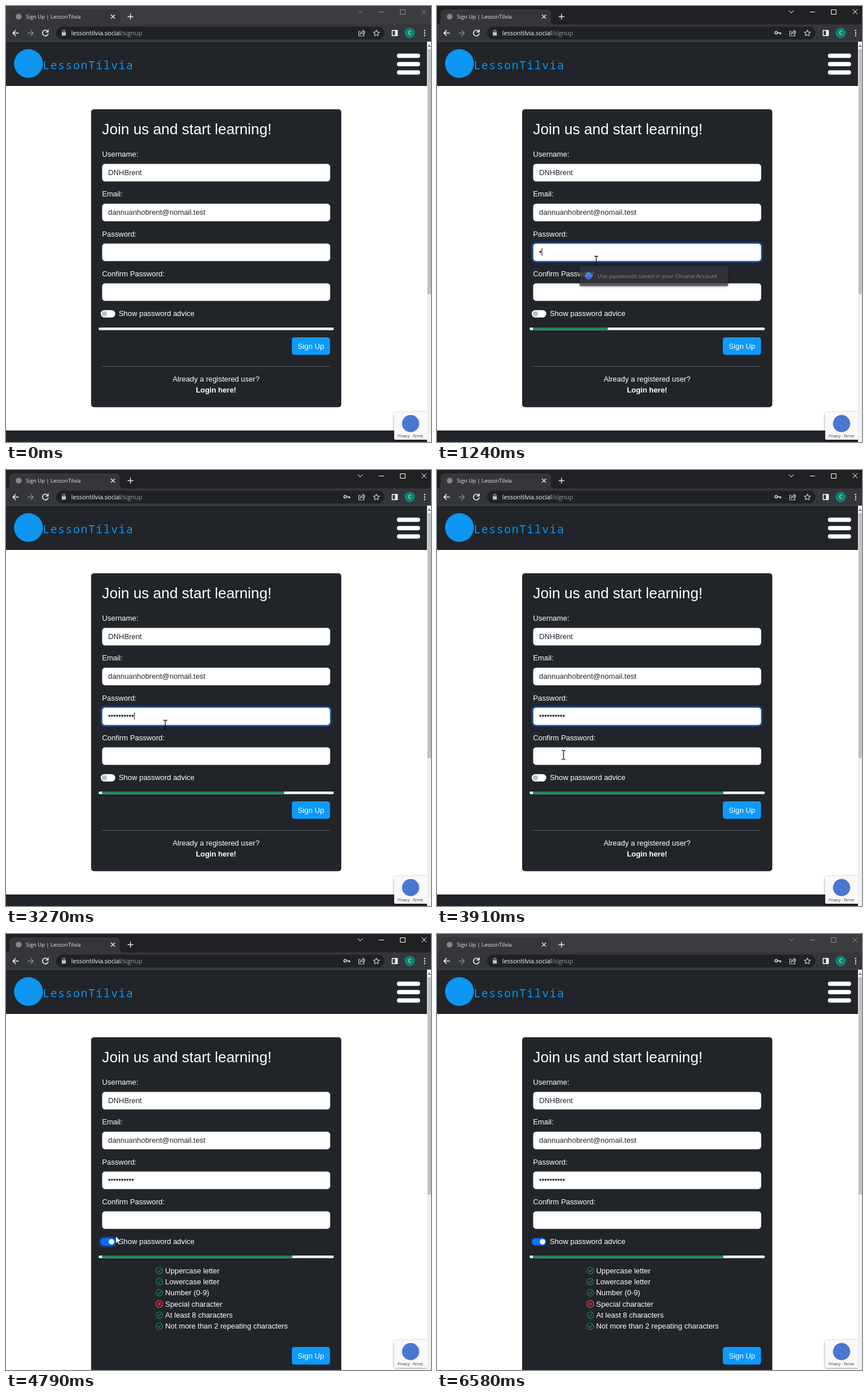
An HTML page for the animation above (6640 ms loop, 739 by 758 pixels).

```html
<!DOCTYPE html>
<html lang="en">
<head>
<meta charset="utf-8">
<title>Sign Up</title>
<style>
  html, body { margin: 0; width: 100%; height: 100%; overflow: hidden; background: #fff; }
  svg { display: block; width: 739px; height: 758px; }
  text { white-space: pre; }
  .page { font: 12.88px "Liberation Sans", Arial, sans-serif; fill: #fff; }
  .ui { font-family: "Open Sans", "Noto Sans", sans-serif; }
  .line { fill: none; stroke-linecap: round; stroke-linejoin: round; }
</style>
</head>
<body>
<svg viewBox="0 0 739 758" xmlns="http://www.w3.org/2000/svg">
  <defs>
    <filter id="soft" x="-20%" y="-20%" width="140%" height="150%">
      <feDropShadow dx="0" dy="1" stdDeviation="2" flood-color="#000" flood-opacity=".4"/>
    </filter>
  </defs>
  <rect width="739" height="758" fill="#fff"/>

  <!-- form card -->
  <g class="page">
    <rect id="card" x="148" y="179.5" width="435" height="518" rx="5" fill="#212529"/>
    <text x="167" y="223" font-size="25.76">Join us and start learning!</text>
    <g id="fields"></g>
    <g id="secret" fill="#212529">
      <text id="dots" x="177.5" y="432.3"></text>
      <path id="caret" d="M0 421v13" stroke="#111" stroke-width="1"/>
    </g>
    <rect id="toggleRing" x="161.8" y="526" width="31" height="18.2" rx="9.1" fill="#0d6efd"/>
    <rect id="toggle" x="164.6" y="528.7" width="25.4" height="12.8" rx="6.4"/>
    <circle id="knob" cy="535.1" r="4.7"/>
    <text x="196" y="539">Show password advice</text>
    <rect x="161" y="559" width="409" height="4.4" rx="2" fill="#f8f9fa"/>
    <rect id="bar" x="167" y="559" height="4.4" fill="#198754"/>
    <g id="advice"></g>
    <g id="lower">
      <rect x="497" y="576" width="66.4" height="30.6" rx="4.5" fill="#0d99ff"/>
      <text x="507.3" y="595.5">Sign Up</text>
      <path d="M167 626.5H563.5" stroke="#585c60" stroke-width="1"/>
      <text x="365.3" y="653" text-anchor="middle">Already a registered user?</text>
      <text x="365.3" y="672.3" text-anchor="middle" font-weight="bold">Login here!</text>
      <rect y="738" width="732" height="30" fill="#212529"/>
    </g>
  </g>

  <!-- privacy badge -->
  <g filter="url(#soft)"><rect x="675" y="706" width="60" height="48" rx="2" fill="#f9f9f9"/></g>
  <circle cx="703.5" cy="726" r="15" fill="#4a78d0"/>
  <text x="681" y="750" font-size="6.3" class="ui" fill="#333">Privacy - Terms</text>

  <!-- saved passwords popup -->
  <g id="popup">
    <rect x="248" y="452" width="258" height="35" rx="2" fill="#35363a" filter="url(#soft)"/>
    <circle cx="263.5" cy="469" r="6.5" fill="#4285f4"/>
    <text x="279" y="473" font-size="9.85" class="ui" fill="#a4a7ab">Use passwords saved in your Orvane Account</text>
  </g>

  <!-- site header -->
  <rect y="62" width="732" height="77" fill="#212529"/>
  <circle cx="39" cy="100" r="25" fill="#0d96f2"/>
  <text x="64" y="109.5" font-size="19.4" font-weight="500" letter-spacing="1.55" fill="#0d96f2"
        font-family="'Noto Sans Mono', 'DejaVu Sans Mono', monospace">LessonTilvia</text>
  <path class="line" d="M683.4 86.5h33M683.4 101h33M683.4 115.5h33" stroke="#fff" stroke-width="7.4"/>

  <!-- scrollbar -->
  <rect x="732" y="62" width="7" height="696" fill="#f1f1f1"/>
  <path d="M733 71l3-4 3 4z" fill="#777"/>
  <rect id="thumb" x="733" y="75" width="6" fill="#c1c1c1"/>

  <!-- browser frame -->
  <g class="ui">
    <rect id="frame" width="739" height="33"/>
    <path d="M0 32Q6 32 6 26V13Q6 6 13 6H191Q198 6 198 13V26Q198 32 204 32H739V62H0z" fill="#35363a"/>
    <path d="M0 61.5H739" stroke="#4b4c50"/>
    <circle cx="22" cy="18.5" r="5" fill="#85878a"/>
    <text x="34.5" y="22" font-size="9.3" fill="#e8eaed">Sign Up | LessonTilvia</text>
    <path class="line" d="M183 15.5l6 6m0-6l-6 6M212 18.5h9m-4.5-4.5v9" stroke="#e8eaed" stroke-width="1.4"/>
    <g id="controls" class="line" stroke-width="1">
      <path d="M612 8l4 4 4-4M649 10.5h8M686 6.5h8v8h-8zM723 6l8 8m0-8l-8 8"/>
    </g>
    <rect x="87" y="36" width="571" height="22" rx="11" fill="#202124"/>
    <g class="line" stroke="#f1f3f4" stroke-width="1.6">
      <path d="M21.5 47H12m4.5-4.5L12 47l4.5 4.5"/>
      <path d="M38 47h9.5m-4.5-4.5L47.500 47l-4.5 4.500" stroke="#85878b"/>
      <path d="M72.500 44a5 5 0 1 0 .8 4.200M73.300 41.500v3.700h-3.700"/>
    </g>
    <path d="M97 45.500h7v6h-7z" fill="#bdc1c6"/>
    <path class="line" d="M98.500 45.500v-1.500a2 2 0 0 1 4 0v1.500" stroke="#bdc1c6" stroke-width="1.100"/>
    <text x="113.500" y="50.800" font-size="10.700" fill="#fff">lessontilvia.social<tspan fill="#9aa0a6">/signup</tspan></text>
    <g class="line" stroke="#c8cbcf" stroke-width="1.200">
      <g id="key" stroke-width="1.700"><circle cx="589.700" cy="46.500" r="2.200"/><path d="M592.500 46.500h5v2.200m-2-2.200v1.500"/></g>
      <path d="M616 44h-2.500v8h9v-2.500M616 49q.5-4.500 5-4.500v-2.500l3 3.500-3 3.500v-2.500q-3 0-5 2.500"/>
      <path d="M644 41.800l1.600 3.400 3.700.4-2.800 2.500.8 3.700-3.300-1.900-3.300 1.900.8-3.700-2.800-2.500 3.700-.4z"/>
      <path d="M671.500 42.500h9v9h-9z" stroke="#fff" stroke-width="1.500"/>
    </g>
    <path d="M676.500 42h4.500v10h-4.500z" fill="#fff"/>
    <circle cx="702" cy="47" r="9" fill="#0b8577"/>
    <text x="702" y="50.300" font-size="9" text-anchor="middle" fill="#fff">C</text>
    <path class="line" d="M728 42.700v0M728 47v0M728 51.300v0" stroke="#f1f3f4" stroke-width="2.400"/>
  </g>

  <g id="pointer">
    <path id="beam" class="line" d="M-2.800 -8q2.300 0 2.800 1 .5-1 2.800-1M0-7V7M-2.800 8q2.300 0 2.800-1 .5 1 2.800 1" stroke="#111" stroke-width="1.300"/>
    <path id="arrow" d="M0 0V13.500l3.100-2.900 2.100 4.800 2.200-1-2.100-4.600h4.300z" fill="#fff" stroke="#111" stroke-width=".8"/>
  </g>
</svg>
<script>
const LOOP = 6640;
const FOCUS = 400, PRESS = 4400, RELEASE = 4510, BLUR = 6420;
const KEYS = [745, 1360, 1780, 2120, 2330, 2540, 2750, 2980, 3090, 3200];
// time and number of the six password rules met
const SCORES = [[745, 2], [1360, 3], [2120, 4], [2980, 5]];
const PATH = [
  [90, 430, 775], [370, 277, 443], [3520, 277, 443], [4250, 174, 537.5],
  [4620, 174, 537.5], [5400, 309, 435], [5900, 309, 435], [6380, 430, 775]
];
const FIELD_GAP = 69.2, LINE = 19.35, ADVICE_HEIGHT = 142;

const $ = id => document.getElementById(id);
const set = (id, attrs) => {
  for (const name in attrs) $(id).setAttribute(name, attrs[name]);
};
const show = (id, on) => set(id, { visibility: on ? 'visible' : 'hidden' });
const clamp = v => Math.min(1, Math.max(0, v));
const ramp = (t, start, length) => clamp((t - start) / length);
const smooth = p => p * p * (3 - 2 * p);

// CSS "ease": cubic-bezier(.25, .1, .25, 1)
function ease(p) {
  const bezier = (s, a, b) => 3 * s * (1 - s) ** 2 * a + 3 * s * s * (1 - s) * b + s ** 3;
  let low = 0, high = 1;
  for (let i = 0; i < 18; i++) {
    const mid = (low + high) / 2;
    if (bezier(mid, .25, .25) < p) low = mid; else high = mid;
  }
  return bezier(low, .1, 1);
}

$('fields').innerHTML = [
  ['Username:', 'DNHBrent'], ['Email:', 'dannuanhobrent@nomail.test'],
  ['Password:', ''], ['Confirm Password:', '']
].map(([label, value], i) => {
  const y = i * FIELD_GAP;
  const ring = i === 2
    ? `<rect id="ring" x="164.4" y="${y + 272}" width="401.800" height="35.800" rx="7" fill="#0d6efd"/>` : '';
  return `<text x="167" y="${y + 262.200}">${label}</text>${ring}
    <rect ${i === 2 ? 'id="password"' : ''} x="167.400" y="${y + 274.800}" width="396" height="30" rx="4.800" fill="#fff" stroke="#ced4da" stroke-width=".8"/>
    <text x="177.500" y="${y + 293.800}" fill="#212529">${value}</text>`;
}).join('');

$('advice').innerHTML = [
  'Uppercase letter', 'Lowercase letter', 'Number (0-9)', 'Special character',
  'At least 8 characters', 'Not more than 2 repeating characters'
].map((rule, i) => {
  const failed = i === 3;
  const icon = failed
    ? '<path d="M-2.400-5.700h4.800l3.300 3.300v4.800l-3.300 3.300h-4.800l-3.300-3.300v-4.800zM-2-2l4 4m0-4l-4 4"/>'
    : '<circle r="5.700"/><path d="M-2.700.3l2 2 3.700-4.500"/>';
  return `<g transform="translate(266.600 ${585.2 + i * LINE})">
    <g class="line" stroke="${failed ? '#dc3545' : '#198754'}" stroke-width="${failed ? 1.6 : 1.2}">${icon}</g>
    <text x="10.200" y="4.400">${rule}</text></g>`;
}).join('');

function pointerAt(t) {
  const next = PATH.findIndex(point => point[0] > t);
  if (next < 0) return PATH[PATH.length - 1].slice(1);
  if (next === 0) return PATH[0].slice(1);
  const [t0, x0, y0] = PATH[next - 1], [t1, x1, y1] = PATH[next];
  const p = smooth(ramp(t, t0, t1 - t0));
  return [x0 + (x1 - x0) * p, y0 + (y1 - y0) * p];
}

function overField(x, y) {
  const offset = y - 274.8;
  return x > 167 && x < 563 && offset > 0 && offset < 4 * FIELD_GAP && offset % FIELD_GAP < 31;
}

function update(t) {
  const active = t >= FOCUS - 20 && t < BLUR;
  set('frame', { fill: active ? '#202124' : '#3c3d41' });
  set('controls', { stroke: active ? '#fff' : '#8d8e91' });
  show('key', t >= 480);

  const typed = KEYS.filter(key => key <= t);
  const lastKey = typed.length ? typed[typed.length - 1] : FOCUS;
  const typing = t >= FOCUS && t < PRESS;
  $('dots').textContent = '•'.repeat(typed.length);
  set('caret', { transform: `translate(${178 + 4.52 * typed.length} 0)` });
  show('caret', typing && (t - lastKey) % 1000 < 500);
  set('ring', { opacity: .42 * (ramp(t, FOCUS, 150) - ramp(t, PRESS, 150)) });
  set('password', { stroke: typing ? '#86b7fe' : '#ced4da' });
  set('popup', { opacity: .95 * (ramp(t, 480, 120) - ramp(t, 1220, 130)) });

  let score = 0;
  for (const [start, goal] of SCORES) score += (goal - score) * ease(ramp(t, start, 600));
  set('bar', { width: 397 * score / 6 });

  const open = t >= RELEASE;
  const focused = t >= PRESS && t < BLUR;
  const pressed = focused && !open;
  set('toggle', { fill: open ? '#0d6efd' : pressed ? '#e2e6ee' : '#fff' });
  set('toggleRing', { opacity: focused ? .4 : 0 });
  set('knob', {
    cx: 171 + 12.4 * ease(ramp(t, RELEASE, 150)),
    fill: open ? '#fff' : pressed ? '#79a5e5' : '#bfbfbf'
  });
  show('advice', open);
  const shift = open ? ADVICE_HEIGHT : 0;
  set('lower', { transform: `translate(0 ${shift})` });
  set('card', { height: 518 + shift });
  set('thumb', { height: open ? 378 : 426 });

  const [x, y] = pointerAt(t);
  const beam = overField(x, y);
  set('pointer', { transform: `translate(${x} ${y})` });
  show('beam', beam);
  show('arrow', !beam);
}

function tick() {
  update(performance.now() % LOOP);
  requestAnimationFrame(tick);
}
tick();
</script>
</body>
</html>
```
